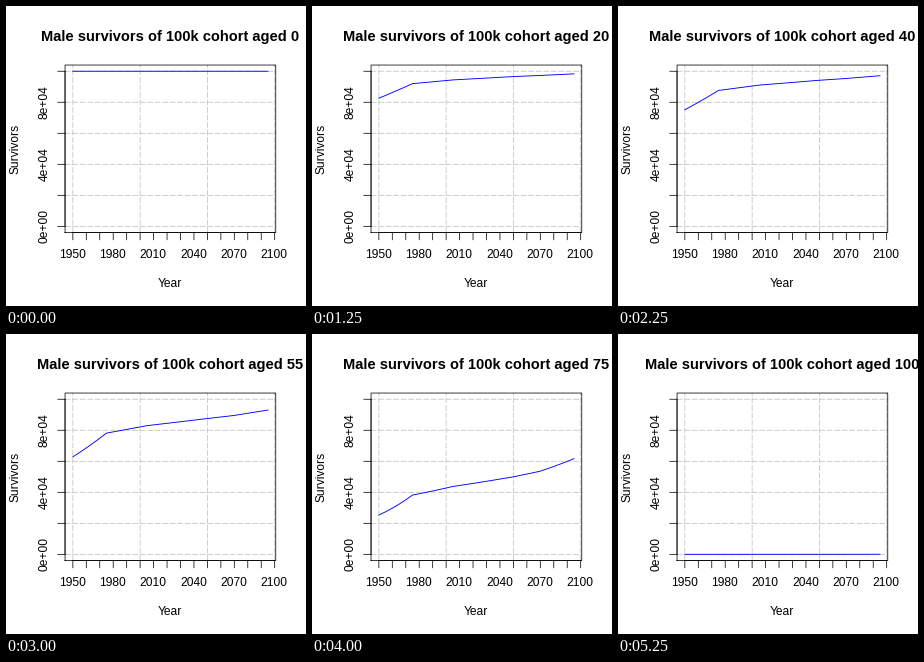
Recreate the animation shown at these times as a matplotlib script. Size 300 by 300 pixels, loop 5500 ms.

```python
import matplotlib.pyplot as plt
import numpy as np
from matplotlib.animation import FuncAnimation

SIZE, DPI = 300, 100
PX = 72 / DPI
LINE = 14.4  # height of one margin line in pixels
LEFT, TOP = 4.1 * LINE, 4.1 * LINE
RIGHT, BOTTOM = SIZE - 2.1 * LINE, SIZE - 5.1 * LINE
MID_X, MID_Y = (LEFT + RIGHT) / 2, (TOP + BOTTOM) / 2

plt.rcParams.update({
    "font.family": "Liberation Sans",
    "text.hinting": "force_autohint",
    "text.hinting_factor": 8,
    "path.snap": False,
})

AGES = [0, 1, *range(5, 101, 5)]
YEARS = np.arange(1950, 2096, 5)

# Mortality trend: early-life hazard and ageing hazard at 65 in key years
KEY_YEARS = [1950, 1975, 2005, 2050, 2070, 2095]
EARLY = np.interp(YEARS, KEY_YEARS, [0.134, 0.058, 0.040, 0.024, 0.019, 0.0118])
AGEING = np.interp(YEARS, KEY_YEARS, [0.460, 0.330, 0.281, 0.233, 0.205, 0.149])


def ageing_hazard(age):
    """Exponential growth with age; all cohorts converge at age 105."""
    limit = 13
    return limit * (AGEING / limit) ** ((105 - age) / 40)


def survivors(age):
    """Survivors per year, in thousands."""
    early = EARLY * (1 - np.exp(-1.4 * age) + 0.018 * age)
    return 100 * np.exp(-early - ageing_hazard(age) + ageing_hazard(0))


def x_of(year):
    scale = (RIGHT - LEFT) / 1.08
    return LEFT + scale * (0.04 + (year - 1950) / 145)


def y_of(thousands):
    scale = (BOTTOM - TOP) / 1.08
    return BOTTOM - scale * (0.04 + thousands / 100)


fig = plt.figure(figsize=(SIZE / DPI, SIZE / DPI), dpi=DPI, facecolor="white")
ax = fig.add_axes([0, 0, 1, 1])
ax.set(xlim=(0, SIZE), ylim=(SIZE, 0))
ax.axis("off")


def stroke(xs, ys, color="black", width=0.75, zorder=3, **style):
    return ax.plot(xs, ys, color=color, lw=width * PX, zorder=zorder,
                   snap=False, **style)[0]


def label(x, y, text, size=12, **style):
    return ax.text(x, y, text, fontsize=size * PX, ha="center", va="baseline",
                   rotation_mode="anchor", **style)


# Grid
grid = dict(color="gray", dashes=(7, 3), dash_capstyle="round", zorder=1)
grid["color"] = "#bebebe"
for year in range(1950, 2101, 50):
    stroke([x_of(year)] * 2, [BOTTOM, TOP], **grid)
for level in range(0, 101, 20):
    stroke([LEFT, RIGHT], [y_of(level)] * 2, **grid)

# Frame and axes
stroke([LEFT, RIGHT, RIGHT, LEFT, LEFT], [BOTTOM, BOTTOM, TOP, TOP, BOTTOM])
stroke([x_of(1950), x_of(2100)], [BOTTOM] * 2)
stroke([LEFT] * 2, [y_of(0), y_of(100)])
for year in range(1950, 2101, 10):
    stroke([x_of(year)] * 2, [BOTTOM, BOTTOM + LINE / 2])
for level in range(0, 101, 20):
    stroke([LEFT, LEFT - LINE / 2], [y_of(level)] * 2)

for year in range(1950, 2101, 30):
    label(x_of(year) - 0.5, 252, str(year))
for level in (0, 40, 80):
    label(42, y_of(level), f"{level * 1000:.0e}", rotation=90)
label(MID_X - 0.5, 281, "Year")
label(13, MID_Y, "Survivors", rotation=90)

curve = stroke([], [], color="blue", width=0.9, zorder=2)
title = label(MID_X - 0.5, 35, "", size=14.58, weight="bold")


def update(index):
    age = AGES[index]
    curve.set_data(x_of(YEARS), y_of(survivors(age)))
    title.set_text(f"Male survivors of 100k cohort aged {age}")
    return curve, title


anim = FuncAnimation(fig, update, frames=len(AGES), interval=250,
                     repeat=True, repeat_delay=0)
plt.show()
```
